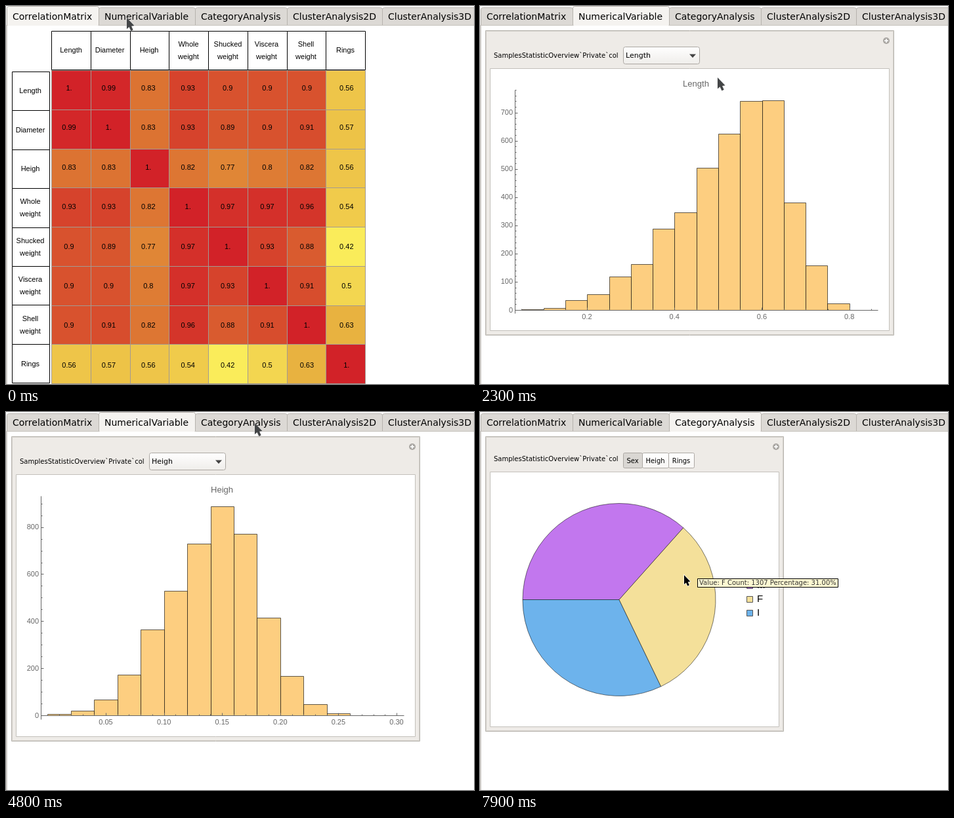
An HTML page with a canvas that plays this animation: 713x577 px, repeating every 8 s.

```html
<!DOCTYPE html>
<html lang="en">
<head>
<meta charset="utf-8">
<title>Dataset explorer</title>
<style>
html, body { margin: 0; width: 100%; height: 100%; overflow: hidden; background: #fff; }
canvas { display: block; }
</style>
</head>
<body>
<canvas id="stage" width="713" height="577"></canvas>
<script>
const c = document.getElementById('stage').getContext('2d');
const SANS = '"DejaVu Sans", sans-serif';
const ARIAL = '"Liberation Sans", Arial, sans-serif';
const LOOP = 8000;
const COLS = ['Length', 'Diameter', 'Heigh', 'Whole weight', 'Shucked weight',
  'Viscera weight', 'Shell weight', 'Rings'];
const TABS = [['CorrelationMatrix', 1], ['NumericalVariable', 141], ['CategoryAnalysis', 288],
  ['ClusterAnalysis2D', 428], ['ClusterAnalysis3D', 573]];
// Upper triangle of the matrix, in percent
const CORR = [[100, 99, 83, 93, 90, 90, 90, 56], [100, 83, 93, 89, 90, 91, 57],
  [100, 82, 77, 80, 82, 56], [100, 97, 97, 96, 54], [100, 93, 88, 42],
  [100, 91, 50], [100, 63], [100]];
const RAMP = [[42, 250, 236, 90], [63, 232, 178, 64], [83, 220, 115, 50], [100, 210, 34, 40]];
const HISTS = {
  Length: {
    bins: [2, 6, 36, 55, 118, 162, 288, 346, 504, 625, 741, 743, 381, 157, 23, 1],
    x0: 63.3, barW: 33.3, base: 464, unit: 0.4305, yStep: 100, yMinor: 20, yMax: 780,
    labels: ['0.2', '0.4', '0.6', '0.8'], labelX: 163, labelGap: 133.2, minorX: 33.3
  },
  Heigh: {
    bins: [6, 19, 68, 173, 365, 529, 730, 888, 771, 416, 167, 48, 9],
    x0: 63.4, barW: 35.45, base: 463, unit: 0.3592, yStep: 200, yMinor: 50, yMax: 930,
    labels: ['0.05', '0.10', '0.15', '0.20', '0.25', '0.30'], labelX: 152, labelGap: 88.6, minorX: 17.72
  }
};
// time, x, y of the pointer tip
const PATH = [[0, 184, 18], [500, 184, 18], [800, 192, 19], [900, 192, 19], [1000, 193, 20],
  [1200, 193, 20], [2000, 389, 137], [2700, 326, 72], [2800, 326, 72], [3200, 299, 111],
  [3400, 299, 126], [3700, 299, 126], [4400, 373, 36], [4600, 374, 19], [4700, 374, 19],
  [4800, 379, 17], [6000, 379, 17], [6100, 381, 17], [6400, 382, 17], [7100, 345, 168],
  [7500, 311, 249], [8000, 311, 249]];

function lerpRows(rows, k) {
  let i = 1;
  while (i < rows.length - 1 && rows[i][0] < k) i++;
  const a = rows[i - 1], b = rows[i], f = (k - a[0]) / (b[0] - a[0]);
  return a.slice(1).map((v, j) => v + (b[j + 1] - v) * f);
}

function text(s, x, y, size, font = SANS, color = '#000', align = 'left') {
  c.font = size + 'px ' + font;
  c.fillStyle = color;
  c.textAlign = align;
  c.fillText(s, x, y);
}

function box(x, y, x2, y2, fill, stroke, r = 0) {
  c.beginPath();
  c.roundRect(x + 0.5, y + 0.5, x2 - x, y2 - y, r);
  if (fill) { c.fillStyle = fill; c.fill(); }
  if (stroke) { c.strokeStyle = stroke; c.lineWidth = 1; c.stroke(); }
}

function line(x1, y1, x2, y2, color) {
  c.strokeStyle = color;
  c.lineWidth = 1;
  c.beginPath();
  c.moveTo(Math.round(x1) + 0.5, Math.round(y1) + 0.5);
  c.lineTo(Math.round(x2) + 0.5, Math.round(y2) + 0.5);
  c.stroke();
}

function drawTabs(active, hover) {
  c.fillStyle = '#d0cdc9';
  c.fillRect(0, 29, 2, 548);
  TABS.forEach(([name, x], i) => {
    const end = i < 4 ? TABS[i + 1][1] : 718, on = i === active;
    const top = on ? 0 : 2;
    box(x, top, end, 29, on || i === hover ? '#f5f3f0' : '#dcd9d5', '#b7b3ae', [3, 3, 0, 0]);
    text(name, x + 9, 21, 14);
  });
  line(0, 29, 713, 29, '#c6c2bd');
  const x = TABS[active][1];
  line(x + 1, 29, TABS[active + 1][1] - 1, 29, '#f5f3f0');
}

function label(name, x, y) {
  const words = name.split(' ');
  words.forEach((w, i) =>
    text(w, x, y + 4 + (i - (words.length - 1) / 2) * 19, 11, ARIAL, '#000', 'center'));
}

function drawMatrix() {
  const step = 59.75, at = (o, i, s = step) => Math.round(o + i * s);
  for (let r = 0; r < 8; r++) {
    for (let k = 0; k < 8; k++) {
      const v = CORR[Math.min(r, k)][Math.abs(r - k)];
      const x = at(69, k), y = at(98, r);
      c.fillStyle = `rgb(${lerpRows(RAMP, v).map(Math.round)})`;
      c.fillRect(x, y, at(69, k + 1) - x, at(98, r + 1) - y);
      text(v === 100 ? '1.' : String(v / 100), 96 + 60.4 * k, 129 + 60.4 * r, 11, ARIAL, '#000', 'center');
    }
  }
  for (let i = 0; i < 9; i++) {
    line(at(69, i), 98, at(69, i), 576, '#a39a92');
    line(69, at(98, i), 547, at(98, i), '#a39a92');
  }
  COLS.forEach((name, i) => {
    box(at(69, i), 38, at(69, i + 1), 97, '#fff', '#000');
    label(name, at(98.5, i), 67);
    box(9, at(100, i, 59.4), 66, at(100, i + 1, 59.4), '#fff', '#000');
    label(name, 37, 129 + 59.5 * i);
  });
}

function drawPanel(right, bottom, innerTop, labelY) {
  box(8, 37, right, bottom, '#eeebe7', '#b9b6b0');
  box(9, 38, right - 1, bottom - 1, null, '#d4d1cb');
  box(15, innerTop, right - 7, bottom - 7, '#fff', '#c3c0bb');
  const x = right - 11;
  c.fillStyle = '#aaa7a3';
  c.beginPath();
  c.arc(x, 53, 5, 0, 7);
  c.fill();
  c.fillStyle = '#fff';
  c.fillRect(x - 3, 52.2, 6, 1.6);
  c.fillRect(x - 0.8, 50, 1.6, 6);
  text('SamplesStatisticOverview`Private`col', 21, labelY, 10);
}

function drawHistogram(name) {
  const h = HISTS[name], axis = '#666', y0 = h.base;
  text(name, 329, 123, 13, ARIAL, axis, 'center');
  h.bins.forEach((n, i) => {
    const x = Math.round(h.x0 + i * h.barW), x2 = Math.round(h.x0 + (i + 1) * h.barW);
    box(x, Math.round(y0 - n * h.unit), x2, y0, '#fdce80', 'rgba(0,0,0,.62)');
  });
  line(53, 128, 53, 469, axis);
  line(53, y0, 606, y0, axis);
  for (let v = 0; v <= h.yMax; v += h.yMinor) {
    const y = y0 - v * h.unit, major = v % h.yStep === 0;
    line(53, y, major ? 57 : 55, y, axis);
    if (major) text(v, 50, y + 3.5, 11, ARIAL, axis, 'right');
  }
  for (let x = h.x0; x < 600; x += h.minorX) line(x, y0 - 2, x, y0, axis);
  h.labels.forEach((s, i) => {
    const x = h.labelX + i * h.labelGap;
    line(x, y0 - 4, x, y0, axis);
    text(s, x, y0 + 14, 11, ARIAL, axis, 'center');
  });
}

function shade(top, bottom) {
  const g = c.createLinearGradient(0, 62, 0, 89);
  g.addColorStop(0, top);
  g.addColorStop(1, bottom);
  return g;
}

function drawNumeric(t, tipY) {
  drawPanel(630, 502, 95, 79);
  box(218, 62, 334, 88, shade('#fff', '#efedea'), '#aca8a3', 3);
  text(t < 3800 ? 'Length' : 'Heigh', 222, 79, 11);
  c.fillStyle = '#444';
  c.beginPath();
  c.moveTo(319, 73.5);
  c.lineTo(329, 73.5);
  c.lineTo(324, 79);
  c.fill();
  drawHistogram(t < 4500 ? 'Length' : 'Heigh');
  if (t < 2900 || t >= 3800) return;
  const pick = Math.max(0, Math.floor((tipY - 89) / 16));
  box(218, 88, 333, 217, '#fff', '#b4b1ad');
  COLS.forEach((name, i) => {
    if (i === pick) {
      c.fillStyle = '#d07238';
      c.fillRect(219, 105 + 16 * (i - 1), 114, 16);
    }
    text(name, 227, 100 + 16 * i, 11, SANS, i === pick ? '#fff' : '#000');
  });
}

function slice(from, to, fill, width) {
  c.beginPath();
  c.moveTo(212, 286.5);
  c.arc(212, 286.5, 147, from, to);
  c.closePath();
  c.fillStyle = fill;
  c.fill();
  c.strokeStyle = 'rgba(0,0,0,.65)';
  c.lineWidth = width;
  c.stroke();
}

function drawCategory(t) {
  drawPanel(462, 487, 91, 75);
  [['Sex', 218, 247], ['Heigh', 247, 287], ['Rings', 287, 326]].forEach(([name, x, x2], i) => {
    box(x, 62, x2, 85, i ? shade('#fff', '#f6f4f2') : '#dad7d3', '#aca8a3', 2);
    text(name, (x + x2) / 2, 78, 10, SANS, '#000', 'center');
  });
  const lit = t >= 7700 && t < 7900;
  const parts = [['M', 1528, '#c277ee'], ['I', 1342, '#6db3ec'], ['F', 1307, '#f4e09a']];
  const arcs = {};
  let angle = Math.PI;
  for (const k of [0, 2, 1]) {
    const [name, count] = parts[k], next = angle + count / 4177 * 2 * Math.PI;
    arcs[name] = [angle, next];
    angle = next;
  }
  parts.forEach(([name, , fill]) => slice(...arcs[name], fill, lit && name === 'F' ? 2 : 0.8));
  [0, 2, 1].forEach((k, i) => {
    const y = 260 + 21 * i;
    box(406, y, 415, y + 9, parts[k][2], '#555');
    text(parts[k][0], 422, y + 9, 15, ARIAL);
  });
  if (t >= 7500 && !lit) {
    box(331, 254, 545, 267, '#fdf8d2', '#000');
    text('Value: F Count: 1307 Percentage: 31.00%', 334, 264, 10, SANS, '#333');
  }
}

function drawPointer(x, y, small) {
  c.save();
  c.translate(x, y);
  if (small) c.scale(0.82, 0.82);
  c.beginPath();
  [[0, 0], [0, 17], [3.6, 14], [6.4, 20], [9.6, 18.6], [7, 12.8], [11.4, 12]]
    .forEach(([px, py]) => c.lineTo(px, py));
  c.closePath();
  c.lineWidth = small ? 1.6 : 1;
  c.strokeStyle = small ? '#fff' : 'rgba(225,225,225,.8)';
  c.stroke();
  c.fillStyle = small ? '#000' : '#434547';
  c.fill();
  c.restore();
}

function draw(now) {
  const t = Math.floor(now % LOOP / 100) * 100;
  const [x, y] = lerpRows(PATH, t);
  const page = t < 1200 ? 0 : t < 6400 ? 1 : 2;
  const hover = page === 0 && t >= 600 ? 1 : page === 1 && t >= 5600 ? 2 : -1;
  c.fillStyle = '#fff';
  c.fillRect(0, 0, 713, 577);
  drawTabs(page, hover);
  if (page === 0) drawMatrix();
  else if (page === 1) drawNumeric(t, y);
  else drawCategory(t);
  drawPointer(x, y, t >= 7500);
}

const start = performance.now();
function tick() {
  draw(performance.now() - start);
  requestAnimationFrame(tick);
}
tick();
</script>
</body>
</html>
```
